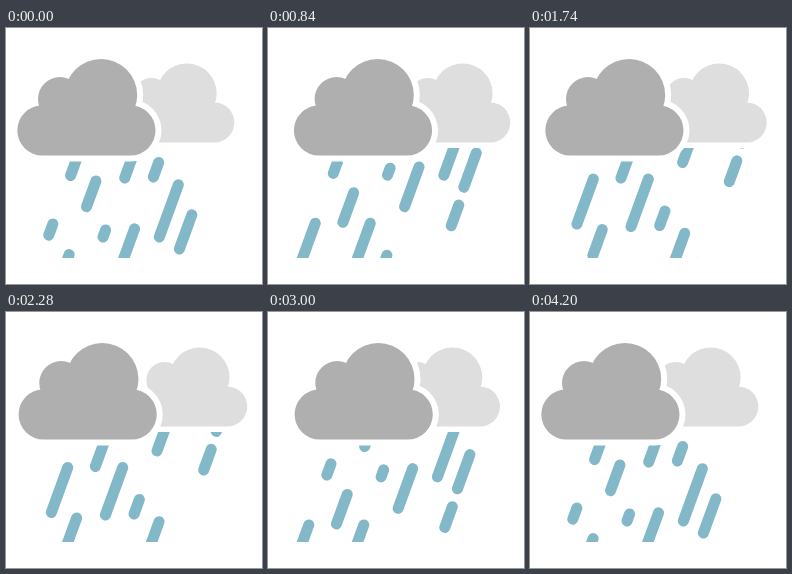
Animation of 256 by 256 pixels, one loop 4.26 s. Source, as an HTML page with a canvas:

```html
<!DOCTYPE html>
<html lang="en">
<head>
<meta charset="utf-8">
<title>Rain clouds</title>
<style>
  html, body { margin: 0; width: 100%; height: 100%; overflow: hidden; background: #fff; }
  canvas { display: block; }
</style>
</head>
<body>
<canvas id="stage" width="256" height="256"></canvas>
<script>
const ctx = document.getElementById('stage').getContext('2d');

const LOOP = 4260, STEP = 60;
const FALL_TIME = 525, FALL = 154.6;
const SLANT = Math.tan(20 * Math.PI / 180);

// Body: [left, top, right, bottom]; puffs: [x, y, radius]
const FRONT = {
  color: '#afafaf', body: [11.3, 77.3, 149.5, 127.6],
  puffs: [[95, 67.2, 36.2], [54, 71, 22]]
};
const BACK = {
  color: '#dedede', body: [115, 74.5, 228.3, 114.6],
  puffs: [[180.7, 65.4, 29.9], [145.5, 68, 18]]
};

// Each drop: x where its line crosses y = 0, top and bottom y at the cycle start
const DROPS = [
  [118.3, 102.5, 147.5], [118.2, 196, 207.2],
  [145.6, 72, 101.5], [145.6, 153, 178.7],
  [173.3, 102.5, 150], [173.1, 202, 209],
  [201.6, 134.5, 149], [201.6, 200.8, 240.5],
  [229.4, 156.7, 209], [253.8, 186.8, 221], [255.2, 84.3, 105]
];

// Smooth swing 0 -> 16 -> 0
const sway = (t, period) => 8 * (1 - Math.cos(2 * Math.PI * t / period));

function fillCloud({ body: [l, t, r, b], puffs }, dx, pad, color) {
  ctx.beginPath();
  ctx.roundRect(l + dx - pad, t - pad, r - l + 2 * pad, b - t + 2 * pad, (b - t) / 2 + pad);
  for (const [x, y, radius] of puffs) {
    ctx.moveTo(x + dx + radius + pad, y);
    ctx.arc(x + dx, y, radius + pad, 0, 2 * Math.PI);
  }
  ctx.fillStyle = color;
  ctx.fill();
}

function drawRain(t) {
  ctx.save();
  ctx.beginPath();
  ctx.rect(0, 120, 256, 110);
  ctx.clip();
  ctx.strokeStyle = '#82b8c7';
  ctx.lineWidth = 11;
  ctx.lineCap = 'round';
  ctx.beginPath();
  const phase = t % FALL_TIME / FALL_TIME;
  for (const [x, top, bottom] of DROPS) {
    for (const cycle of [-1, 0, 1]) {
      const dy = (phase + cycle) * FALL;
      ctx.moveTo(x - SLANT * (top + dy), top + dy);
      ctx.lineTo(x - SLANT * (bottom + dy), bottom + dy);
    }
  }
  ctx.stroke();
  ctx.restore();
}

function draw(now) {
  const t = Math.floor(now % LOOP / STEP) * STEP;
  const frontX = sway(t + 10, 2100), backX = sway(t + 22, 1400);
  ctx.fillStyle = '#fff';
  ctx.fillRect(0, 0, 256, 256);
  drawRain(t);
  fillCloud(BACK, backX, 0, BACK.color);
  fillCloud(FRONT, frontX, 6, '#fff');
  fillCloud(FRONT, frontX, 0, FRONT.color);
}

const start = performance.now();
function tick() {
  draw(performance.now() - start);
  requestAnimationFrame(tick);
}
tick();
</script>
</body>
</html>
```
